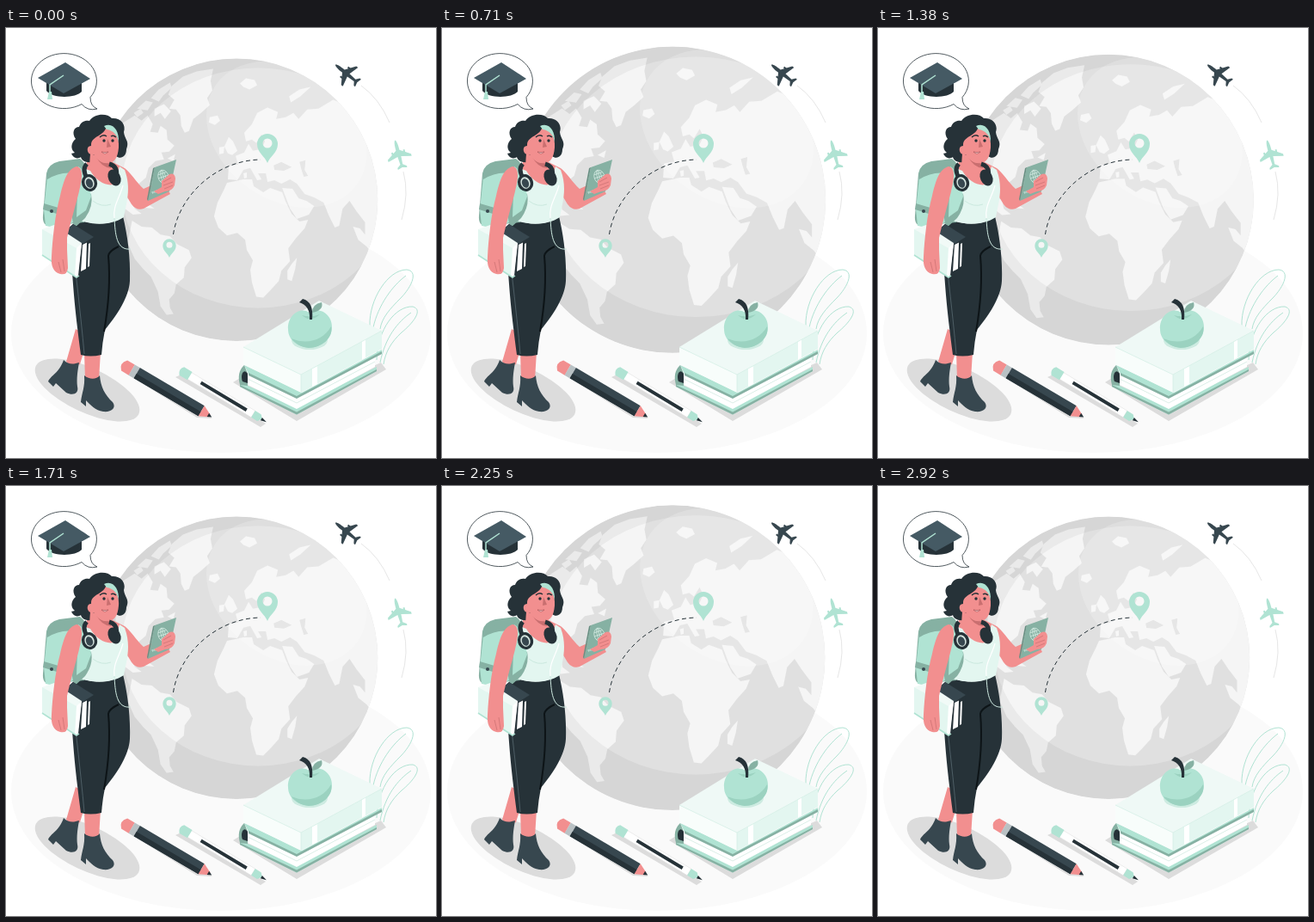
Write an HTML page that moves like this. It is 500 by 500 pixels and loops after 2960 ms.

```html
<!DOCTYPE html>
<html lang="en">
<head>
<meta charset="utf-8">
<title>Study abroad</title>
<style>
html, body { margin: 0; width: 100%; height: 100%; overflow: hidden; background: #fff }
svg { display: block; width: 100%; height: 100% }
.dark { fill: #263238 } .slate { fill: #37474f } .steel { fill: #455a64 }
.mint { fill: #b0e3d3 } .pale { fill: #e3f6f0 } .teal { fill: #86b1a3 }
.skin { fill: #f28f8f } .shade { fill: #dcdcdc } .land { fill: #f5f5f5 } .white { fill: #fff }
.line { fill: none; stroke: #b0e3d3 } .ink { fill: none; stroke: #263238 } .thin { fill: none; stroke: #e6e6e6 }
</style>
</head>
<body>
<svg viewBox="0 0 500 500">
<defs>
  <clipPath id="ball"><circle cx="268" cy="199.7" r="163.7"/></clipPath>
  <path id="plane" d="M0-18C1.500-17 2.100-13 2.100-6L14 2V4.500L2.100 1.500 1.400 11 5.500 14V16L0 14.500-5.500 16V14L-1.400 11-2.100 1.500-14 4.500V2L-2.100-6C-2.100-13-1.500-17 0-18ZM6-5H8V0H6ZM-8-5H-6V0H-8Z"/>
  <path id="pin" fill-rule="evenodd" d="M0 0C-3-8-12-12-12-22A12 12 0 0 1 12-22C12-12 3-8 0 0ZM0-28.500A5.500 5.500 0 1 0 0-17.500A5.500 5.500 0 1 0 0-28.500Z"/>
</defs>

<ellipse cx="250" cy="355" rx="244" ry="139" fill="#fafafa"/>

<g id="globe"><g clip-path="url(#ball)">
  <circle cx="268" cy="199.7" r="164" fill="#e0e0e0"/>
  <g class="land">
    <path d="M193 68 206 57 222 51 241 48 238 62 240 73 234 82 237 90 227 99 218 106 213 120 208 122 204 114 203 102 198 95 190 94 196 84 189 78Z"/>
    <path d="M128 126 136 111 150 102 158 108 165 102 171 112 168 121 177 122 180 114 187 119 188 130 196 137 190 144 181 145 184 153 174 155 166 163 163 174 155 181 157 191 151 194 145 187 136 190 138 198 148 199 150 210 158 216 148 217 128 202Z"/>
    <path d="M153 94 163 85 171 87 165 96ZM169 82 178 72 191 64 193 70 183 79 178 86ZM173 94 184 89 192 97 185 106 180 99 173 103ZM149 99 157 94 160 99 153 104ZM188 152 197 147 195 155ZM156 205 166 205 173 210 162 209Z"/>
    <path d="M147 224 158 231 170 232 180 240 191 242 199 251 213 258 216 267 208 278 207 290 198 298 196 308 190 315 191 325 195 332 187 333 180 323 177 306 169 289 160 280 150 268 142 250Z"/>
    <path d="M272 65 279 59 289 61 292 67 283 72 276 69ZM237 104 246 102 249 108 243 113 236 110ZM254 138 259 127 264 132 269 143 263 148 258 146ZM248 139 254 138 253 146 248 147Z"/>
    <path d="M259 161 270 159 267 149 277 145 282 135 287 143 297 141 301 132 297 124 291 134 286 130 279 132 277 122 286 112 292 99 304 93 316 98 314 106 325 104 334 99 340 106 350 95 363 94 380 84 395 90 440 102V262L425 262 419 254 409 246 403 231 411 233 417 240 417 226 407 213 399 201 391 210 387 230 382 232 375 218 369 203 358 197 347 193 338 181 330 176 320 181 312 177 304 179 302 169 293 169 297 176 292 177 284 163 276 165 269 177 258 176Z"/>
    <path d="M329 80 341 72 354 69 342 80 331 87ZM386 70 399 74 404 80 392 78ZM276 169 280 168 280 174 277 175Z"/>
    <path d="M257 180 276 176 286 176 288 184 299 191 307 186 321 191 325 202 332 216 341 225 351 223 347 233 337 244 328 256 330 271 320 282 317 294 307 305 299 313 291 312 286 296 284 281 287 270 280 258 278 246 269 238 257 241 247 232 242 219 246 203 253 189Z"/>
    <path d="M321 186 333 187 340 198 349 201 358 207 352 217 338 222 330 210ZM332 274 338 267 336 280 332 294 327 292 327 282Z"/>
  </g>
  <path fill="#e0e0e0" d="M311 160 320 156 332 162 323 166 312 165ZM341 156 348 154 347 165 351 172 346 173 343 164Z"/>
  <path fill-rule="evenodd" fill="#000" opacity=".045" d="M104 36H433V364H104ZM293 47A158 139 0 0 0 293 325A158 139 0 0 0 293 47Z"/>
  <ellipse cx="326" cy="124" rx="100" ry="76" transform="rotate(35 326 124)" fill="#fff" opacity=".2"/>
</g></g>

<path class="ink" stroke-dasharray="5 3.500" d="M194.500 240C201 196 243 154 296 153"/>
<use href="#pin" class="mint" transform="translate(304 157)"/>
<use href="#pin" class="mint" transform="translate(190 267) scale(.64)"/>

<path class="thin" d="M413 67Q434 82 446 110M462 167Q469 193 460 223"/>
<use href="#plane" class="slate" transform="translate(397 54) rotate(-51)"/>
<use href="#plane" class="mint" transform="translate(457 148) rotate(-15)"/>

<!-- speech bubble -->
<path class="ink" stroke-width=".8" style="fill:#fff" d="M88 88.500A38 32 0 1 1 98 80.600Q98 91 106 94Q95 97 88 88.500Z"/>
<path class="dark" d="M47 62V73C53 82 81 82 88 74V62Z"/>
<path class="steel" d="M37 58 69 40 98 59 67 76Z"/>
<path class="line" stroke-width="1.500" d="M67 55 51 66V76"/>
<path class="mint" d="M50 74H53L54 83H48Z"/>

<!-- leaves -->
<g class="line">
  <path d="M423 346C422 316 444 281 466 281C481 283 470 303 459 314C446 327 437 337 435 350M427 348C433 322 449 300 465 288"/>
  <path d="M431 386C432 350 453 323 473 324C487 328 470 346 460 354C448 365 441 377 439 391M435 389C441 360 455 342 471 331"/>
</g>

<!-- books -->
<path class="shade" d="M264 412 277 404 340 432 436 389 442 397 338 457Z"/>
<path class="mint" d="M272 412 338 441 431 394V399L338 449.500 272 417Z"/>
<path class="teal" d="M272 415 338 446.500 431 397V399L338 449.500 272 417Z"/>
<path class="white" d="M281 402 338 430 429 381V394L338 443 281 415Z"/>
<path fill="none" stroke="#dcefe8" d="M281 408 338 436 429 388"/>
<path class="mint" d="M277 392 344 424 437 374V378L338 430 282 402Z"/>
<path class="teal" d="M282 401 338 428 437 376V379L338 431 282 404ZM277 392Q268 400 272 415L281 416V402Z"/>
<path class="dark" d="M275 401Q278 397 281 402V413L275 411Q273 406 275 401Z"/>
<path fill="#eff9f6" d="M276 371 364 317 437 352 343 403Z"/>
<path fill="#f8fdfb" d="M276 371 343 403V424L276 391Z"/>
<path class="pale" d="M343 403 437 352V373L343 424Z"/>
<path class="white" d="M356 396 362 393V414L356 417ZM414 364.500 418 362V383L414 385.500Z"/>
<path fill="none" stroke="#d5efe6" stroke-width=".8" d="M276 371 343 403 437 352M343 403V424"/>
<ellipse cx="353" cy="363" rx="21" ry="11" fill="#cdebe1"/>
<path class="mint" d="M353 331C365 323 380 334 379 349C378 363 366 371 353 372C339 371 328 363 328 350C327 335 341 323 353 331Z"/>
<path fill="#9bd2c0" d="M378 347C381 360 367 372 352 372C343 371 336 367 332 361C350 369 369 363 378 347ZM344 334Q354 343 365 333Q354 337 344 334Z"/>
<path class="dark" d="M353 339Q354 323 341 319L345 315Q358 318 356 339Z"/>
<path class="teal" d="M356 331Q356 321 367 319Q370 328 356 331Z"/>

<!-- pencil and pen -->
<path class="shade" d="M140 402 146 398 240 454 222 453ZM197 406 206 402 302 460 296 464Z"/>
<g transform="translate(135 391) rotate(30.500)">
  <path class="skin" d="M3-7H13V7H3Q-4 0 3-7Z"/>
  <path fill="#b9c1c4" d="M13-7H20V7H13Z"/>
  <path class="slate" d="M20-7H107V7H20Z"/>
  <path class="dark" d="M20 1H107V7H20Z"/>
  <path class="skin" d="M107-7 118-1.500V1.500L107 7Z"/>
  <path class="dark" d="M116-2.500 121 0 116 2.500Z"/>
</g>
<g transform="translate(202 397) rotate(31)">
  <path fill="#fff" stroke="#dedede" stroke-width=".5" d="M10-4H100V5H10Z"/>
  <path class="mint" d="M3-5H14V6H3Q-2 0 3-5ZM100-4H108L112 0 108 5H100Z"/>
  <path class="dark" d="M29-1.500H91V2.500H29ZM111-1.500 118 .500 111 2.500Z"/>
</g>

<!-- traveller -->
<ellipse class="shade" cx="94.500" cy="421" rx="66" ry="26" transform="rotate(25 94.500 421)"/>
<path class="skin" d="M81 350 96 358 86 391Q77 395 70 388ZM91 376H110L108 409Q100 414 92 409Z"/>
<g class="slate">
  <path d="M67 386C73 392 79 391 85 389C83 400 82 408 83 417C85 425 78 428 70 424L58 413 55 417 49 411C52 404 62 401 67 386Z"/>
  <path d="M91 404C97 409 105 409 109 404C110 417 115 427 124 435C129 442 122 447 113 446C104 445 98 438 93 433V440L87 435C88 424 92 418 91 404Z"/>
</g>
<path class="dark" d="M80 221C100 230 122 230 136 219C141 240 145 266 144 294C143 314 128 335 115 351Q112 366 111 380Q98 383 87 380C84 357 80 326 78 298C76 270 75 245 80 221Z"/>
<path fill="none" stroke="#0d1417" stroke-width="2" d="M131 254Q120 259 119 265C122 299 118 330 114 353"/>
<path fill="none" stroke="#596a72" stroke-width=".8" d="M81 284Q88 345 91 379"/>

<!-- backpack -->
<path class="teal" d="M47 169Q49 158 62 155L86 152Q98 160 99 190L91 226 52 230Q42 231 43 218Z"/>
<path class="mint" d="M48 173Q62 162 77 169L78 226Q61 234 46 230L44 211Z"/>
<path class="teal" d="M47 170Q66 155 91 161L87 171Q67 164 48 176ZM44 204 61 209 59 216 43 211Z"/>
<circle class="slate" cx="53" cy="213" r="2"/>

<path class="skin" d="M94 154H120L138 163C145 168 152 180 160 187L182 177 191 193 160 210Q152 213 146 205L137 190 92 194Z"/>
<path class="pale" d="M93 164 98 166C105 178 116 184 125 182L132 161 138 165C146 186 140 204 137 220C121 231 94 229 80 221C88 205 94 190 93 164Z"/>
<path fill="none" stroke="#c4e5da" stroke-width=".8" d="M101 201Q111 209 122 205"/>
<path fill="none" stroke="#fff" stroke-width="1.200" d="M136 183C132 198 124 207 126 221"/>
<path fill="none" stroke="#cfeae1" d="M126 221C127 239 128 259 145 257"/>
<!-- near strap and side -->
<path class="teal" d="M86 196 99 193Q102 207 92 221L79 233 76 215Z"/>
<path class="mint" d="M84 161Q95 166 99 196L93 212 82 220Z"/>

<path class="dark" d="M97 108C103 99 118 99 123 105C133 104 140 112 137 121C138 130 144 131 140 141C140 150 133 153 128 149L104 155C95 158 88 155 87 150C83 153 78 151 76 146L80 145C73 139 78 131 81 129C76 122 79 115 85 115C87 109 92 107 97 108Z"/>
<path class="skin" d="M98 146 121 154 122 165Q112 177 97 160Z"/>
<path fill="#c96f70" d="M105 150Q111 159 122 157V163Q111 162 105 150Z"/>
<path class="skin" d="M99 135C100 126 112 126 116 117C126 117 132 126 131 139C130 151 126 157 118 157C110 157 105 152 102 147C94 149 92 137 99 137Z"/>
<path class="mint" d="M114 114C124 109 132 119 131 133C130 125 125 119 117 118Z"/>
<circle class="dark" cx="114" cy="131" r="1.700"/><circle class="dark" cx="124" cy="131" r="1.700"/>
<path class="ink" stroke-width="1.500" d="M109 127Q113 123 117 126M122 126Q125 124 128 127"/>
<path fill="#c96f70" d="M118 129 122 138 117 139Z"/>
<path class="white" stroke="#a94c50" stroke-width=".7" d="M111 144Q115 145 119 144Q115 148 111 144Z"/>

<!-- headphones -->
<path class="ink" stroke-width="5" d="M94 158Q88 164 94 174M120 158Q131 161 128 174"/>
<ellipse class="dark" cx="97" cy="180" rx="9" ry="10" transform="rotate(-20 97 180)"/>
<ellipse cx="97" cy="180" rx="5.500" ry="7" transform="rotate(-20 97 180)" fill="#d5e4df"/>
<ellipse class="slate" cx="97" cy="180.500" rx="4" ry="5.500" transform="rotate(-20 97 180.500)"/>
<ellipse class="dark" cx="126" cy="174" rx="7" ry="10" transform="rotate(-25 126 174)"/>

<!-- passport and hand -->
<path class="teal" d="M173 162 198 153 190 190 165 201Z"/>
<path fill="#688f82" d="M165 201 173 162 171 163 164 199Z"/>
<g fill="none" stroke="#d9eee7" stroke-width=".7" transform="translate(183 173) rotate(-18)">
  <ellipse rx="6" ry="8"/><ellipse rx="2.500" ry="8"/><path d="M-6 0H6M-5-4H5M-5 4H5M0-8V8"/>
</g>
<text transform="translate(170 193) rotate(-20)" font-family="Lato, sans-serif" font-size="3.400" font-weight="700" fill="#e3f6f0">PASSPORT</text>
<path class="skin" d="M181 178 190 170Q196 168 197 175L196 183Q193 190 185 190L177 193 172 190 181 185Z"/>
<path fill="none" stroke="#c96f70" stroke-width=".7" d="M183 179 192 174M183 183 194 179M184 187 194 183"/>

<!-- carried books and near arm -->
<path class="dark" d="M66 238 78 228 102 243 100 278 87 284 89 251Z"/>
<path class="slate" d="M78 228 102 243 89 251 67 238Z"/>
<path class="white" d="M89 252 94 249.500 93 280 87 283Z"/>
<path class="white" d="M96 251 98 250 97 277 95 278Z"/>
<path fill="#f1faf7" d="M42 234 56 229 88 250 83 290 42 264Z"/>
<path class="pale" d="M42 234 82 256 82 290 42 264Z"/>
<path class="white" d="M82 256 88 250 84 288 80 290Z"/>
<path class="line" stroke-width="1.500" d="M42 264 82 290 85 288"/>
<path class="skin" d="M82 161C71 164 67 178 63 195C57 217 54 246 53 266C52 276 55 284 63 286Q71 288 72 279L71 258 71 244C75 226 81 206 85 190C89 174 90 162 82 161Z"/>
<path fill="none" stroke="#c96f70" stroke-width=".7" d="M61 272 64 284M66 269 68 283"/>
</svg>
<script>
const globe = document.getElementById('globe');
const loop = 2960, lead = 20;
// Two swells: a quick one that eases off slowly, then a quick rise and fall.
const keys = [[0, 1], [.2, 1.1], [.6, 1], [.8, 1.1], [1, 1]];

function scaleAt(p) {
  const i = keys.findIndex(k => k[0] > p);
  const [a, from] = keys[i - 1], [b, to] = keys[i];
  return from + (to - from) * (p - a) / (b - a);
}

function draw(now) {
  const s = scaleAt((now + lead) % loop / loop);
  globe.setAttribute('transform', `translate(268 199.700) scale(${s}) translate(-268 -199.700)`);
  requestAnimationFrame(draw);
}
draw(0);
</script>
</body>
</html>
```
